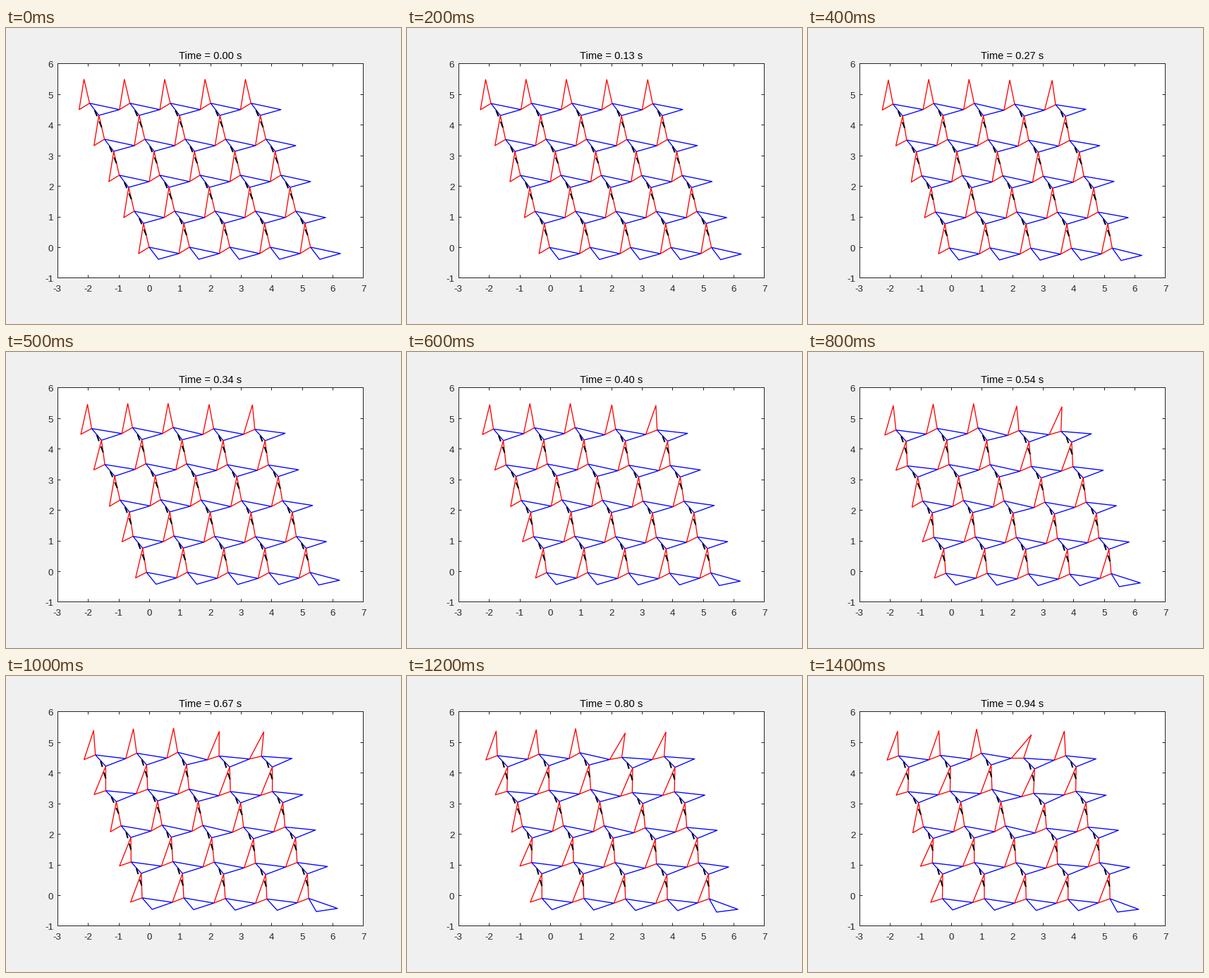
Write a matplotlib script that moves like this. It is 560 px wide and 420 px high and loops after 1.5 s.

```python
import numpy as np
import matplotlib.pyplot as plt
from matplotlib.animation import FuncAnimation
from matplotlib.collections import LineCollection, PolyCollection

W, H = 560, 420
PT = 0.72            # points per pixel at 100 dpi
UNIT = 43.4          # pixels per data unit
N, FRAMES = 5, 15
DT = 0.067
K_MID, K_END = 8, 14

plt.rcParams["font.family"] = "Liberation Sans"

# Joints: hubs join red and blue in a cell, sides join neighbours in a row,
# tips join a red top to the blue triangle of the row above.
hub = np.arange(25).reshape(N, N)
side = 25 + np.arange(30).reshape(N, N + 1)
tip = 55 + np.arange(30).reshape(N + 1, N)

red = np.stack([hub, side[:, :-1], tip[1:]], -1).reshape(-1, 3)
blue = np.stack([hub, side[:, 1:], tip[:-1]], -1).reshape(-1, 3)


def corner(a, b, c):
    """Angle between sides a and b, opposite side c."""
    return np.arccos((a * a + b * b - c * c) / (2 * a * b))


def polar(r, angle):
    return r * np.array([np.cos(angle), np.sin(angle)])


def rest_joints():
    up = np.radians(103.2)
    left_dir = up + corner(0.4, 0.8, 1.0)
    right_dir = np.arcsin(0.4 * np.sin(left_dir))
    top, left = polar(0.8, up), polar(0.4, left_dir)
    right = polar(1.0, right_dir)
    low = polar(0.5, right_dir - corner(1.0, 0.5, 0.7))
    pts = np.zeros((85, 2))
    for j in range(N):
        for i in range(N):
            p = i * (right - left) + j * (top - low)
            pts[hub[j, i]] = p
            pts[side[j, i]], pts[side[j, i + 1]] = p + left, p + right
            pts[tip[j, i]], pts[tip[j + 1, i]] = p + low, p + top
    return pts


rest = rest_joints()
tri = np.r_[red, blue]
bars = np.r_[tri[:, [0, 1]], tri[:, [1, 2]], tri[:, [2, 0]]]
length = np.linalg.norm(rest[bars[:, 0]] - rest[bars[:, 1]], axis=1)

# All hubs are guided, and three loose joints on the rim.
guided = np.r_[hub.ravel(), side[0, -1], tip[-1, 0], tip[-1, 3]]


def grow(k, mid, end):
    """Cubic that leaves zero from rest and passes through both keys."""
    a, b = np.array(mid) / K_MID ** 2, np.array(end) / K_END ** 2
    return k * k * (a + (b - a) * (k - K_MID) / (K_END - K_MID))


def shift(k):
    """Pixel shift of the guided joints, y pointing down."""
    across = np.linspace(0, 1, N)
    up = across[:, None]
    # Each row slides and stretches between its two ends.
    left = np.array([[-12.3], [-5.5], [3.1], [1.7], [9.7]])
    right = np.array([[-3.5], [2.6], [6.9], [11.6], [17.3]])
    dx = grow(k, 0.62, 1) * (left + (right - left) * across)
    # The bottom sinks evenly, the top sags by column.
    bottom = grow(k, 3.4, 5.1)
    top = grow(k, [3.2, 1, 1, 5.3, 5.8], [6.2, 5.2, 2.5, 10.2, 6.4])
    dy = bottom + (top - bottom) * up
    rim = grow(k, [[-2.4, 7.8], [10.4, 3.8], [13.6, 3.8]],
               [[-6, 10.8], [16.4, 5.8], [34.6, 10.3]])
    return np.r_[np.c_[dx.ravel(), dy.ravel()], rim]


def settle(pts, goal, stiff=60):
    """Move joints close to their goals while all triangles stay rigid."""
    nb, ng = len(bars), len(guided)
    rows = np.arange(nb)
    for _ in range(8):
        d = pts[bars[:, 0]] - pts[bars[:, 1]]
        dist = np.linalg.norm(d, axis=1)
        jac = np.zeros((nb + 2 * ng, pts.size))
        for axis in (0, 1):
            slope = stiff * d[:, axis] / dist
            jac[rows, 2 * bars[:, 0] + axis] = slope
            jac[rows, 2 * bars[:, 1] + axis] = -slope
            jac[nb + 2 * np.arange(ng) + axis, 2 * guided + axis] = 1
        err = np.r_[stiff * (length - dist), (goal - pts[guided]).ravel()]
        step = np.linalg.lstsq(jac, err, rcond=None)[0]
        pts = pts + step.reshape(-1, 2)
    return pts


poses = [rest]
for k in range(1, FRAMES):
    goal = rest[guided] + shift(k) * [1, -1] / UNIT
    poses.append(settle(poses[-1], goal))

fig = plt.figure(figsize=(W / 100, H / 100), dpi=100, facecolor="#f0f0f0")
ax = fig.add_axes([72.8 / W, 65.6 / H, 433.6 / W, 303.95 / H])
ax.set(xlim=(-3, 7), ylim=(-1, 6), xticks=range(-3, 8), yticks=range(-1, 7))
INK = "#262626"
ax.tick_params(direction="in", top=True, right=True, length=4.3 * PT,
               width=PT, color=INK, labelbottom=False, labelleft=False)
for spine in ax.spines.values():
    spine.set(linewidth=PT, color=INK)


def label(x, y, text, size, **kw):
    return fig.text(x / W, 1 - y / H, text, fontsize=size * PT, **kw)


for v in range(-3, 8):
    label(203 + UNIT * v, 374.3, str(v), 13.33, ha="center", color=INK)
for v in range(-1, 7):
    label(67.3, 316.8 - UNIT * v, str(v), 13.33, ha="right", color=INK)
title = label(289.8, 44, "", 14.67, ha="center", color="black")

blues = PolyCollection([], facecolors="none", edgecolors="#0000ff",
                       linewidths=1.33 * PT)
reds = PolyCollection([], facecolors="none", edgecolors="#ff0000",
                      linewidths=1.33 * PT)
springs = LineCollection([], colors="black", linewidths=2 * PT,
                         linestyles=[(0, (4.5, 4))], capstyle="butt")
for part in (blues, reds, springs):
    ax.add_collection(part, autolim=False)


def draw(k):
    p = poses[k]
    blues.set_verts(p[blue])
    reds.set_verts(p[red])
    lower = (p[hub[:-1]] + p[tip[1:-1]]) / 2
    upper = (p[hub[1:]] + p[tip[1:-1]]) / 2
    springs.set_segments(np.stack([lower, upper], 2).reshape(-1, 2, 2))
    title.set_text(f"Time = {k * DT:.2f} s")
    return blues, reds, springs, title


anim = FuncAnimation(fig, draw, frames=FRAMES, interval=100, repeat=True,
                     repeat_delay=0, blit=False)
plt.show()
```
